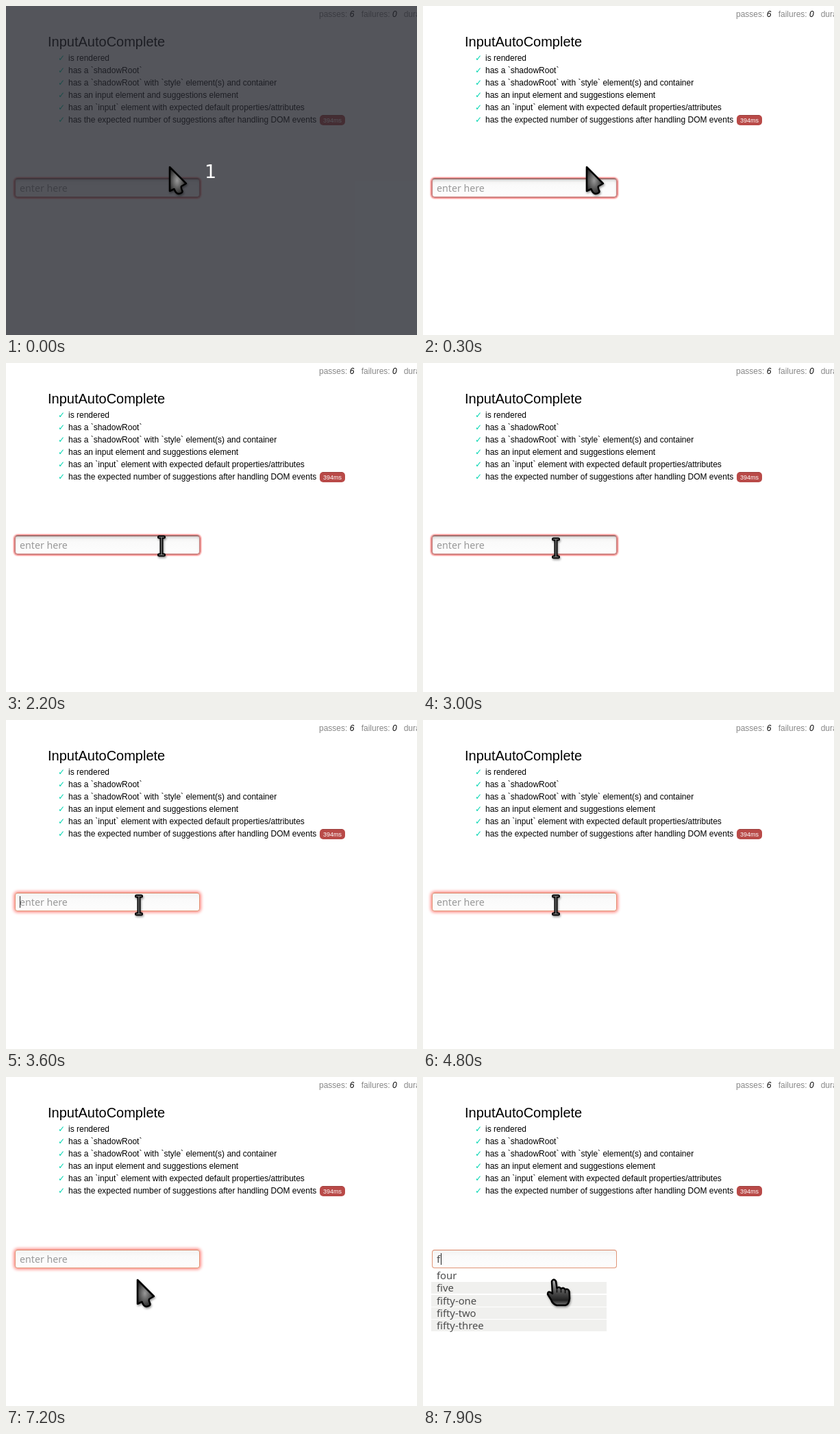
An HTML page that plays this animation: 600 px wide and 480 px high, repeating every 8 s.

```html
<!DOCTYPE html>
<html lang="en">
<head>
<meta charset="utf-8">
<title>Autocomplete demo</title>
<style>
  html, body { margin: 0; width: 600px; height: 480px; overflow: hidden; background: #fff; }
  svg, #field, #shade { position: absolute; }
  svg { left: 0; top: 0; width: 600px; height: 480px; }
  text { white-space: pre; }
  .report { font: 12px "Liberation Sans", Arial, sans-serif; }
  .ui { font: 14.8px "Noto Sans", sans-serif; fill: #4c4c4c; }
  #field {
    box-sizing: border-box; left: 13px; top: 252px; width: 270px; height: 27px;
    border: 1px solid #e09576; border-top-color: #d98263; border-radius: 4px;
    background: linear-gradient(#f3f3f2, #fafafa 35%, #fdfdfd);
  }
  #field.idle {
    left: 12px; top: 251px; width: 272px; height: 29px;
    border: 2px solid #cf8583; border-top-color: #a27270; border-radius: 5px;
    box-shadow: 0 0 2px 1px #ff7474, inset 0 2px 3px #0002;
  }
  #field.focus { box-shadow: 0 0 4px 2px #ff8f8a; }
  #shade { inset: 0; background: rgba(36, 38, 46, .78); }
  #pointer { filter: drop-shadow(1px 2px 1.5px #0006); }
</style>
</head>
<body>
<svg class="report">
  <text x="457" y="16" fill="#888">passes: <tspan class="n">6</tspan></text>
  <text x="518.7" y="16" fill="#888">failures: <tspan class="n">0</tspan></text>
  <text x="580.7" y="16" fill="#888">duration:</text>
  <text x="61" y="59" font-size="20">InputAutoComplete</text>
  <g id="tests"></g>
  <rect x="458" y="159" width="37" height="15" rx="5" fill="#b94a48"/>
  <path d="M462 159.5H491" stroke="#9b3e3c"/>
  <text x="463" y="170" font-size="9" fill="#fff">394ms</text>
</svg>
<div id="field"></div>
<svg class="ui">
  <text id="hint" x="20" y="271" font-size="14.2" fill="#999">enter here</text>
  <text id="typed" x="20" y="271">f</text>
  <path id="caret" stroke="#222"/>
  <g id="list"></g>
</svg>
<div id="shade"></div>
<svg>
  <defs>
    <radialGradient id="metal" cx=".45" cy=".5" r=".6">
      <stop stop-color="#999"/><stop offset=".5" stop-color="#5a5a5a"/><stop offset="1" stop-color="#181818"/>
    </radialGradient>
    <linearGradient id="palm" x2="0" y2="1">
      <stop stop-color="#bbb"/><stop offset=".45" stop-color="#555"/>
      <stop offset=".8" stop-color="#222"/><stop offset="1" stop-color="#777"/>
    </linearGradient>
  </defs>
  <text id="count" x="290" y="251" font-size="27" font-family="DejaVu Sans, sans-serif" fill="#fff">1</text>
  <g id="pointer" stroke="#000" stroke-width="2.5" stroke-linejoin="round" stroke-linecap="round">
    <path id="arrow" fill="url(#metal)" d="M1 1V36L7.5 33Q10 40 14 40Q20 39 19.500 36Q17 31 18 29L25 25Z"/>
    <g id="beam" fill="none">
      <path stroke-width="5" d="M-3.500 -13H3.500M0 -13V13M-3.500 13H3.500"/>
      <path stroke="#999" stroke-width="1.2" d="M-3.500 -13H3.500M0 -13V13M-3.500 13H3.500"/>
    </g>
    <g id="hand" fill="url(#palm)">
      <path d="M8 22L7 4Q10 -1 13 4L14.500 14Q18 11 20.500 15Q24 12 26.500 16Q31 14 32.500 19L33 29Q32 38 27 39H14Q8 37 6 31L1 23Q1 18 5 20Z"/>
      <path fill="none" stroke-width="1.2" d="M14.500 14V20M20.500 15V20M26.500 16V21"/>
    </g>
  </g>
</svg>
<script>
const $ = id => document.getElementById(id);
const show = (id, on) => $(id).style.display = on ? "" : "none";
const LOOP = 8000, FOCUS = 3600, BLINK = 1200, TYPE = 7700, SUGGEST = 7900;

document.querySelectorAll(".n").forEach(n => {
  n.setAttribute("fill", "#000");
  n.setAttribute("font-style", "italic");
});

$("tests").innerHTML = [
  "is rendered",
  "has a `shadowRoot`",
  "has a `shadowRoot` with `style` element(s) and container",
  "has an input element and suggestions element",
  "has an `input` element with expected default properties/attributes",
  "has the expected number of suggestions after handling DOM events"
].map((s, i) => `<text x="76" y="${80 + i * 18}" fill="#00d6b2" font-family="DejaVu Sans, sans-serif">✓</text>
  <text x="91" y="${80 + i * 18}">${s}</text>`).join("");

$("list").innerHTML = ["four", "five", "fifty-one", "fifty-two", "fifty-three"].map((s, i) => {
  const y = Math.round(281 + i * 18.25);
  return `<rect x="12" y="${y}" width="256" height="17" fill="${i ? "#f0f0ee" : "#fff"}"/>
    <text x="20" y="${y + 14}">${s}</text>`;
}).join("");

// start time, pointer shape, x, y
const moves = [
  [0, "arrow", 238, 234],
  [1800, "beam", 254, 255], [2000, "beam", 242, 272], [2100, "beam", 227, 285], [2200, "beam", 227, 267],
  [2400, "beam", 215, 275], [2500, "beam", 205, 278], [2600, "beam", 198, 278],
  [2800, "beam", 193, 276], [2900, "beam", 192, 273], [3000, "beam", 194, 270],
  [4900, "beam", 194, 276], [5000, "beam", 193, 285], [5100, "arrow", 191, 303],
  [5400, "arrow", 191, 295], [SUGGEST, "hand", 181, 294]
];

function draw() {
  const t = performance.now() % LOOP;
  const [, shape, x, y] = moves.findLast(m => m[0] <= t);
  for (const s of ["arrow", "beam", "hand"]) show(s, s === shape);
  $("pointer").setAttribute("transform", `translate(${x} ${y})`);

  const typed = t >= TYPE;
  $("field").className = t < FOCUS ? "idle" : typed ? "" : "focus";
  show("shade", t < 300);
  show("count", t < 300);
  show("hint", !typed);
  show("typed", typed);
  show("list", t >= SUGGEST);
  show("caret", typed || t >= FOCUS && Math.floor((t - FOCUS) / BLINK) % 2 === 0);
  $("caret").setAttribute("d", `M${typed ? 26.5 : 20.5} 257V274`);
  requestAnimationFrame(draw);
}
draw();
</script>
</body>
</html>
```
